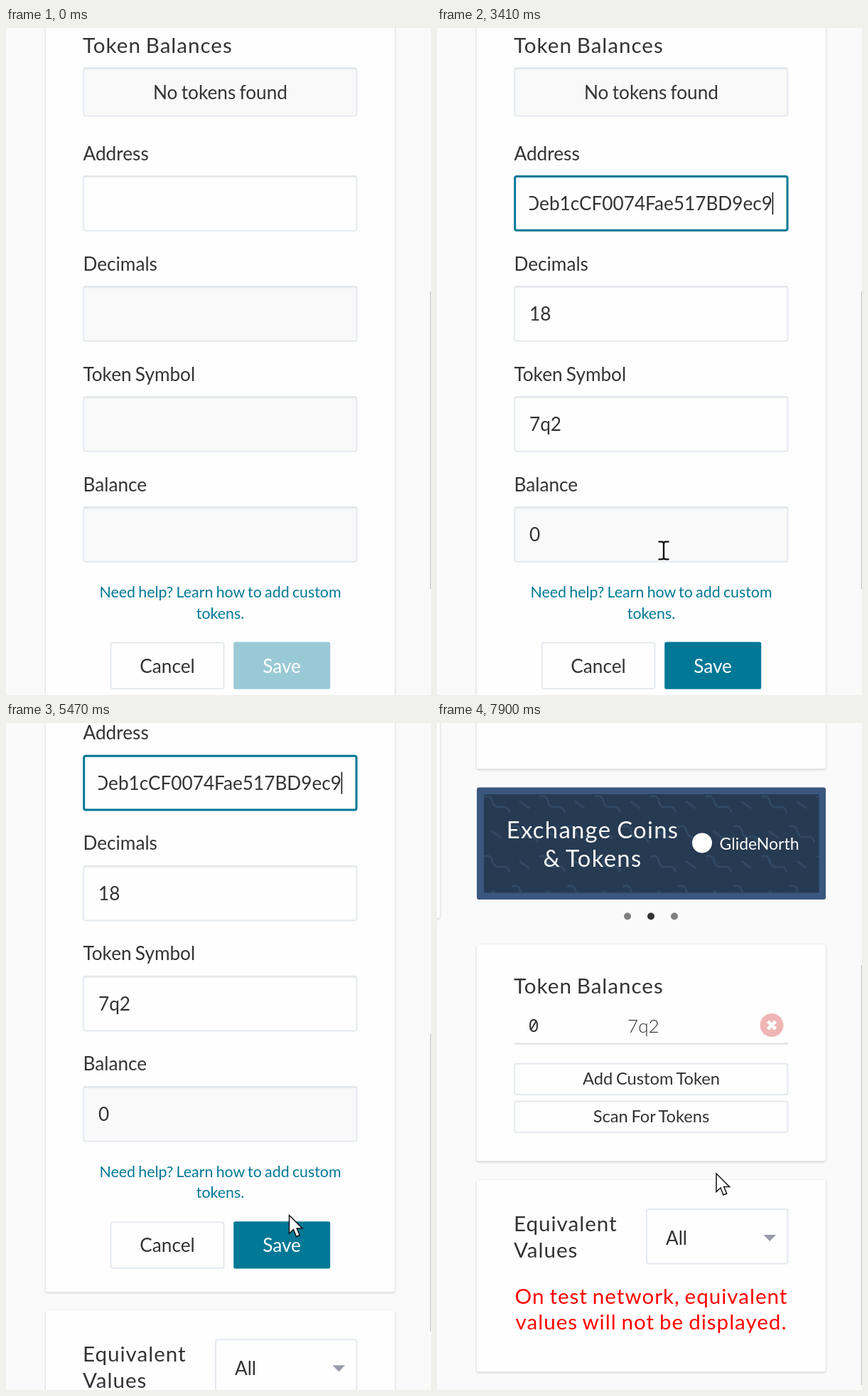
These frames come from a looping animation (598x937 px, 8 s). An HTML page:

```html
<!DOCTYPE html>
<html lang="en">
<head>
<meta charset="utf-8">
<title>Add custom token</title>
<style>
html, body { margin: 0; width: 100%; height: 100%; overflow: hidden; background: #fafafa; }
svg { display: block; width: 598px; height: 937px; }
text { font-family: Lato, sans-serif; font-size: 26.2px; word-spacing: -.055em; fill: #333; white-space: pre; }
.head { font-size: 29.6px; letter-spacing: .98px; }
.link { font-size: 21.35px; fill: #007896; }
.small { font-size: 23.7px; }
.mid { text-anchor: middle; }
.end { text-anchor: end; }
.white { fill: #fff; }
.red { fill: #f00; }
.light { font-weight: 300; }
.promo { font-size: 32.8px; letter-spacing: 1.3px; }
.brand { font-size: 23px; }
.mono { font-family: "Noto Sans Mono", monospace; font-size: 25px; }
.card { fill: #fefefe; filter: drop-shadow(0 1px 1.5px rgba(0,0,0,.22)); }
</style>
</head>
<body>
<svg id="stage" viewBox="0 0 598 937" xmlns="http://www.w3.org/2000/svg"></svg>
<script>
const LOOP = 8000;
const TEAL = '#007896';
const ADDRESS = '0x7DE18c3A8739dAb59Deb1cCF0074Fae517BD9ec9';
const SYMBOL = '7q2';
const LEFT = 108.2, WIDE = 386.3, MID = 301.5, ROW = 155;

// ---- markup helpers ----
const text = (x, y, str, cls = '', id = '') =>
  `<text x="${x}" y="${y}" class="${cls}" ${id && `id="${id}"`}>${str}</text>`;
const card = (y, h, id = '') =>
  `<rect class="card" x="56" y="${y}" width="491" height="${h}" rx="3" ${id && `id="${id}"`}/>`;
const box = (x, y, w, h, fill = '#fefefe', id = '') =>
  `<rect x="${x + 1}" y="${y + 1}" width="${w - 2}" height="${h - 2}" rx="3" fill="${fill}" stroke="#e5eaf0" stroke-width="2" ${id && `id="${id}"`}/>`;
const field = (y, h, fill, id = '') => box(LEFT, y, WIDE, h, fill, id) +
  `<path d="M110 ${y + 2.5}H493" stroke="#000" stroke-opacity=".05" stroke-width="2"/>`;
const button = (y, label) => box(LEFT, y, WIDE, 45.5) + text(MID, y + 30.5, label, 'small mid');

// "Equivalent Values" card with its top edge at y
const values = y => card(y, 269.5) +
  text(108, y + 72, 'Equivalent', 'head') + text(108, y + 108.5, 'Values', 'head') +
  box(294, y + 40, 200.5, 78.5) + text(322, y + 90.5, 'All') +
  `<path d="M459.5 ${y + 77}h17.5l-8.75 9z" fill="#989aa6"/>` +
  text(MID, y + 174, 'On test network, equivalent', 'head red mid') +
  text(MID, y + 210, 'values will not be displayed.', 'head red mid');

function formView() {
  const inputs = ['Address', 'Decimals', 'Token Symbol', 'Balance'].map((label, i) => {
    const value = ['', '18', SYMBOL, '0'][i];
    return text(108.5, 185.5 + ROW * i, label) +
      `<g id="input${i}">${field(207 + ROW * i, 78.7, i ? '#f9f9f9' : '#fefefe', 'box' + i)}
       ${text(130, 256.3 + ROW * i, value, '', 'value' + i)}</g>`;
  });
  return `<g id="form">${card(-30, 991.5, 'formCard')}
    ${text(108, 35, 'Token Balances', 'head')}
    ${field(55, 69.5, '#f9f9f9')}${text(MID, 99.5, 'No tokens found', 'mid')}
    ${inputs.join('')}
    <path id="spinner" d="M122 697A12 12 0 0 1 110.7 689.1" fill="none" stroke="#14294a" stroke-width="2.6" stroke-linecap="round"/>
    <rect id="focus" x="${LEFT + 1.5}" y="208.5" width="${WIDE - 3}" height="75.7" rx="2.5" fill="none" stroke="${TEAL}" stroke-width="3"/>
    <clipPath id="inner"><rect x="130" y="215" width="342.2" height="64"/></clipPath>
    <g clip-path="url(#inner)">${text(472, 256, ADDRESS, 'end', 'addrEnd')}${text(129.5, 256, ADDRESS, '', 'addrStart')}</g>
    <rect id="caret" y="231" width="1.7" height="31" fill="#222"/>
    <g id="lower">
      ${text(MID, 800, 'Need help? Learn how to add custom', 'link mid')}
      ${text(MID, 829.5, 'tokens.', 'link mid')}
      ${box(146.5, 862.5, 161, 66.5)}${text(227, 905.5, 'Cancel', 'mid')}
      <rect id="save" x="320.2" y="862.5" width="136" height="66.2" rx="2.5" stroke-width="2"/>
      ${text(388, 905.5, 'Save', 'white mid')}
      ${values(987.5)}
    </g></g>`;
}

function banner() {
  let waves = '';
  for (let row = 0; row < 4; row++) {
    for (let col = -1; col < 7; col++) {
      const x = 66 + col * 78 + (row % 2) * 39, y = 104 + row * 42;
      waves += `M${x} ${y}q10 -4 12 6t12 8t12 8M${x + 50} ${y + 6}l14 10`;
    }
  }
  const dots = [-1, 0, 1].map(i =>
    `<circle cx="${301 + 33 * i}" cy="271.5" r="5" fill="${i ? '#808080' : '#333'}"/>`);
  return `<rect x="56" y="90.5" width="491" height="157.5" rx="3" fill="#3a577f"/>
    <rect x="66" y="100" width="471.5" height="138.5" fill="#263a52"/>
    <clipPath id="panel"><rect x="66" y="100" width="471.5" height="138.5"/></clipPath>
    <path clip-path="url(#panel)" d="${waves}" fill="none" stroke="#304963" stroke-width="3"/>
    ${text(219, 161.5, 'Exchange Coins', 'promo white mid')}
    ${text(219, 201.5, '&amp; Tokens', 'promo white mid')}
    <circle cx="373" cy="168.5" r="14" fill="#fff"/>
    ${text(397.5, 178, 'GlideNorth', 'brand white')}${dots.join('')}`;
}

function doneView() {
  return `<g id="done">
    <rect class="card" x="-30" y="-20" width="34" height="294.5" rx="3"/>
    ${card(-20, 84.5)}${banner()}
    ${card(311, 304.5)}${text(108, 380, 'Token Balances', 'head')}
    ${text(128.5, 434, '0', 'mono')}${text(268, 434.5, SYMBOL, 'light')}
    <circle cx="471" cy="424.5" r="16.5" fill="#f0b5b5"/>
    <path d="M465.5 419l11 11m0 -11l-11 11" stroke="#fff" stroke-width="4.6"/>
    <path d="M108.5 450.5H494" stroke="#dcdfe2" stroke-width="2"/>
    ${button(477.5, 'Add Custom Token')}${button(530.5, 'Scan For Tokens')}
    ${values(642)}</g>`;
}

function cursors() {
  const beam = 'M-7.5 -12.4H-3Q0 -12.4 0 -9Q0 -12.4 3 -12.4H7.5M-7.5 12.4H-3Q0 12.4 0 9Q0 12.4 3 12.4H7.5M0 -9V9';
  const hand = 'M-2.5 2C-2.5 -1.5 2.5 -1.5 2.5 2V10.5C2.5 7.5 7.2 7.5 7.2 11C7.2 8.5 11.8 8.7 11.8 12.3C11.8 10 16.5 10.3 16.5 14V22C16.5 28 13 29 12.5 36H0C-1 29 -6 26 -9.5 20C-12 16 -8 14.5 -5.5 17L-2.5 20Z';
  return `<g id="cursor">
    <path id="arrow" d="M0 0V25.5L6 20L10 30L14.7 28L10.7 18.5H18.5Z" fill="#fff" stroke="#111" stroke-width="1.5"/>
    <g id="beam" fill="none"><path d="${beam}" stroke="#fff" stroke-width="5"/><path d="${beam}" stroke="#111" stroke-width="2.4"/></g>
    <g id="hand"><path d="${hand}" fill="#fff" stroke="#111" stroke-width="1.5" stroke-linejoin="round"/>
      <path d="M2.5 10V17M7.2 11V18M11.8 12.5V18" stroke="#111" stroke-width="1.3"/></g></g>`;
}

document.getElementById('stage').innerHTML =
  `<rect width="598" height="937" fill="#fafafa"/>${formView()}${doneView()}
   <rect id="thumb" x="596.8" width="1.2" fill="#c4c4c4"/>${cursors()}`;

const ui = {};
document.querySelectorAll('#stage [id]').forEach(n => ui[n.id] = n);
const show = (name, on) => ui[name].style.display = on ? '' : 'none';
const set = (name, attrs) => {
  for (const k in attrs) ui[name].setAttribute(k, attrs[k]);
};

// ---- story ----
const ENTER = 330, FOCUS = 1090, PASTE = 2060, FILL = 2150, LOADED = 2490;
const SCROLL = 4990, PRESS = 5950, SAVED = 6290;

const MOVES = [
  { from: ENTER, to: 950, x: 265, y: 258 },
  { from: 2840, to: 3410, x: 319, y: 734 },
  { from: 3450, to: 3840, x: 82, y: 450 },
  { from: 3840, to: 4050, x: 324, y: 662 },
  { from: 4700, to: 5170, x: 393, y: 664 },
  { from: 5250, to: 5810, x: 409, y: 744 },
  { from: 7880, to: 7900, x: 393, y: 633 }
];

function pointer(t) {
  let x = 502, y = 842;
  for (const m of MOVES) {
    const u = Math.min(1, Math.max(0, (t - m.from) / (m.to - m.from)));
    const e = u * u * (3 - 2 * u);
    x += (m.x - x) * e;
    y += (m.y - y) * e;
  }
  return [x, y];
}

const scrollAt = t => t < SCROLL ? 0 : 164 * (1 - Math.exp((SCROLL - t) / 105));

// The blink restarts with each edit
function caretOn(t) {
  const since = t < PASTE ? FOCUS : PASTE;
  return t >= FOCUS && t < PRESS && (t - since) % 1030 < 540;
}

function cursorKind(x, y) {
  if (y > 780 && y < 840 && x > 130 && x < 472) return 'hand';
  if (x > 108 && x < 495 && y > 163 && y < 755 && (y - 163) % ROW < 125) return 'beam';
  return 'arrow';
}

function render(t) {
  const done = t >= SAVED, pasted = t >= PASTE, filled = t >= FILL, pressed = t >= PRESS;
  const loading = filled && t < LOADED;
  const scroll = scrollAt(t), lift = loading ? 68.5 : 0;
  const [x, y] = pointer(t);

  show('form', !done);
  show('done', done);
  set('form', { transform: `translate(0 ${-scroll})` });
  set('lower', { transform: `translate(0 ${-lift})` });
  set('formCard', { height: 991.5 - lift });

  for (const i of [1, 2, 3]) show('value' + i, filled);
  for (const i of [1, 2]) set('box' + i, { fill: filled ? '#fefefe' : '#f9f9f9' });
  show('input3', !loading);
  show('spinner', loading);
  set('spinner', { transform: `rotate(${(t - 2390) * 0.36} 122 685)` });

  show('addrEnd', pasted && !pressed);
  show('addrStart', pressed);
  show('focus', t >= FOCUS);
  set('focus', { opacity: pressed ? 0.06 : Math.min(1, 0.5 + (t - FOCUS) / 200) });
  show('caret', caretOn(t));
  set('caret', { x: pasted ? 471.5 : 130.3 });

  const hover = filled && y + scroll > 862;
  set('save', {
    fill: !filled ? '#9ac9d6' : hover ? '#00475a' : TEAL,
    stroke: pressed ? '#e59a1c' : 'none'
  });

  const top = done ? 340 : 370 + (loading ? 10 : scroll * 0.41);
  set('thumb', { y: top, height: done ? 590 : loading ? 432 : 418 });

  const kind = done ? 'arrow' : cursorKind(x, y + scroll);
  show('cursor', t >= ENTER);
  for (const name of ['arrow', 'beam', 'hand']) show(name, name === kind);
  set('cursor', { transform: `translate(${x} ${y})` });
}

const start = performance.now();
function tick() {
  render((performance.now() - start) % LOOP);
  requestAnimationFrame(tick);
}
tick();
</script>
</body>
</html>
```
